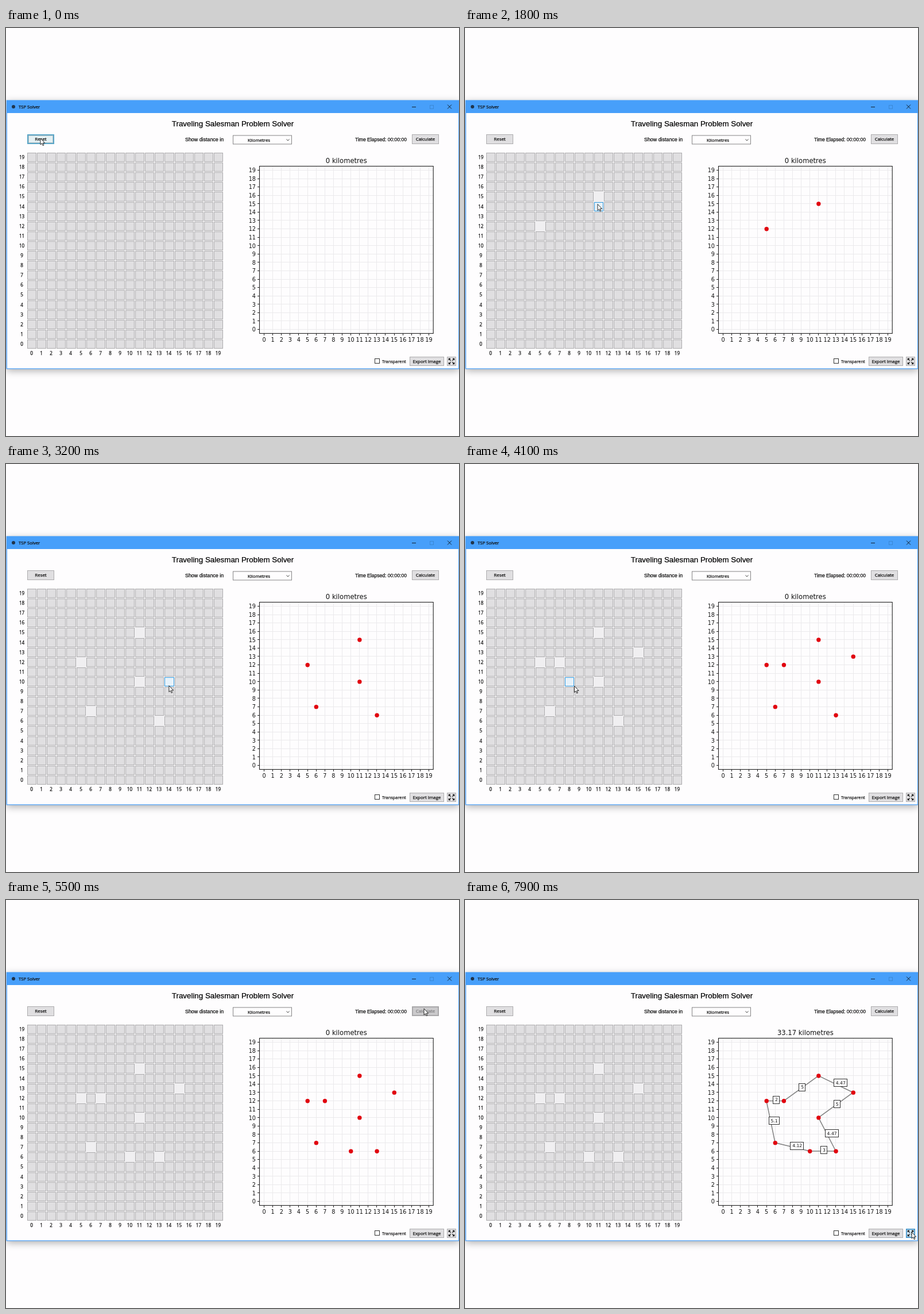
Write an HTML page with a canvas that moves like this. It is 789 by 710 pixels and loops after 8 s.

```html
<!DOCTYPE html>
<html lang="en">
<head>
<meta charset="utf-8">
<title>TSP Solver</title>
<style>
  html, body { margin: 0; width: 100%; height: 100%; overflow: hidden; background: #fefdfe; }
  canvas { display: block; }
</style>
</head>
<body>
<canvas id="stage" width="789" height="710"></canvas>
<script>
const ctx = document.getElementById('stage').getContext('2d');
const LOOP = 8000, STEP = 100, SOLVED = 5600;
const UI = '"Open Sans", "Noto Sans", sans-serif';
const ARIAL = '"Liberation Sans", Arial, sans-serif';
const PLOT = '"DejaVu Sans", sans-serif';
const PAPER = '#fefdfe', INK = '#111';
const N = 20, PITCH = 17.1;

const looks = {
  normal:   { fill: '#e0dfe1', line: '#adacae', w: 1 },
  hover:    { fill: '#e7f2fa', line: '#2d97dc', w: 1 },
  pressed:  { fill: '#cde2f1', line: '#3a90c8', w: 1.6 },
  focus:    { fill: '#e0dfe1', line: '#4a9aca', w: 2 },
  hot:      { fill: '#e4f0f3', line: '#5aa6c8', w: 2, dots: true },
  disabled: { fill: '#cbcacc', line: '#a9a8aa', w: 2, ink: '#858486' }
};

const px = c => 449.5 + 287 / 19 * c;
const py = r => 524.5 - 277 / 19 * r;
const cellX = c => Math.round(37 + PITCH * c);
const cellY = r => Math.round(217 + PITCH * (N - 1 - r));

// cities are chosen at an even pace
const cities = [[5, 12], [11, 15], [11, 10], [6, 7], [13, 6], [15, 13], [7, 12], [10, 6]]
  .map(([c, r], i) => ({ c, r, start: Math.floor((1300 + 443 * i) / STEP) * STEP }));

// the shortest tour visits the cities by angle around their centre
const mean = k => cities.reduce((sum, p) => sum + p[k], 0) / cities.length;
const angle = p => Math.atan2(p.r - mean('r'), p.c - mean('c'));
const tour = [...cities].sort((a, b) => angle(a) - angle(b));
const legs = tour.map((a, i) => {
  const b = tour[(i + 1) % tour.length];
  return { a, b, length: Math.hypot(a.c - b.c, a.r - b.r) };
});
const total = legs.reduce((sum, leg) => sum + leg.length, 0).toFixed(2);

const stops = [
  { x: 60, y: 192, arrive: 0, leave: 500 },
  ...cities.map((p, i) => ({
    x: cellX(p.c) + 6, y: cellY(p.r) + 2,
    arrive: i ? p.start - STEP : 900, leave: p.start
  })),
  { x: 728, y: 189, arrive: 5300, leave: 6600 },
  { x: 778, y: 578, arrive: 7500, leave: LOOP }
];

function text(s, x, y, size, font, align = 'left', color = INK) {
  ctx.font = `${size}px ${font}`;
  ctx.textAlign = align;
  ctx.fillStyle = ctx.strokeStyle = color;
  ctx.fillText(s, x, y);
  if (font === PLOT) return;
  // interface text is slightly heavier
  ctx.lineWidth = 0.25;
  ctx.strokeText(s, x, y);
}

function fill(x, y, w, h, color) {
  ctx.fillStyle = color;
  ctx.fillRect(x, y, w, h);
}

function box(x, y, w, h, look) {
  fill(x, y, w, h, look.fill);
  ctx.strokeStyle = look.line;
  ctx.lineWidth = look.w;
  ctx.strokeRect(x + look.w / 2, y + look.w / 2, w - look.w, h - look.w);
}

function line(points, color, width) {
  ctx.beginPath();
  points.forEach(([x, y]) => ctx.lineTo(x, y));
  ctx.strokeStyle = color;
  ctx.lineWidth = width;
  ctx.stroke();
}

function dot(x, y, r, color) {
  ctx.fillStyle = color;
  ctx.beginPath();
  ctx.arc(x, y, r, 0, 2 * Math.PI);
  ctx.fill();
}

function button(label, x, y, w, h, name) {
  const look = looks[name];
  box(x, y, w, h, look);
  if (look.dots) {
    ctx.setLineDash([1, 1]);
    ctx.strokeStyle = '#8a979b';
    ctx.lineWidth = 1;
    ctx.strokeRect(x + 2.5, y + 2.5, w - 5, h - 5);
    ctx.setLineDash([]);
  }
  text(label, x + w / 2, y + 11, 7.9, UI, 'center', look.ink);
}

function pointerAt(t) {
  const i = stops.findLastIndex(s => s.arrive <= t);
  const from = stops[i], to = stops[i + 1];
  if (!to || t <= from.leave) return [from.x, from.y];
  const u = (t - from.leave) / (to.arrive - from.leave);
  const v = u ** 1.07;
  const ex = 1 - (1 - u) ** 1.12, ey = v * v * (3 - 2 * v);
  return [from.x + (to.x - from.x) * ex, from.y + (to.y - from.y) * ey];
}

function drawFrame() {
  fill(0, 0, 789, 710, PAPER);
  ctx.save();
  ctx.shadowColor = 'rgba(0,0,0,.3)';
  ctx.shadowBlur = 12;
  ctx.shadowOffsetY = 3;
  fill(0.7, 125.5, 788.3, 468, '#479ffa');
  ctx.restore();
  fill(2, 148, 786, 444.3, PAPER);

  dot(13, 137, 3, '#20354c');
  text('TSP Solver', 22, 140, 7.7, UI);
  line([[707, 137.5], [714, 137.5]], '#15202c', 1);
  ctx.strokeStyle = '#3b89d6';
  ctx.strokeRect(738.5, 134.5, 6, 6);
  line([[769, 133.5], [776, 140.5]], '#15202c', 1);
  line([[776, 133.5], [769, 140.5]], '#15202c', 1);

  text('Traveling Salesman Problem Solver', 395, 171, 13.35, ARIAL, 'center', '#000');
  text('Show distance in', 312, 197, 8.9, ARIAL);
  text('Time Elapsed: 00:00:00', 608, 196.5, 8.55, ARIAL);
  box(395, 186.5, 103, 16, { fill: PAPER, line: '#858486', w: 1 });
  text('Kilometres', 440.5, 197.5, 7.8, UI, 'center');
  line([[488.5, 193.5], [491, 196], [493.5, 193.5]], '#444', 1);

  box(642, 575, 9, 9, { fill: '#fff', line: '#333', w: 1 });
  text('Transparent', 655, 583, 7.4, UI);
}

function drawExpand(name) {
  box(768, 572, 16, 16, looks[name]);
  for (const sx of [-1, 1]) for (const sy of [-1, 1]) {
    const at = (a, b) => [776 + sx * a, 580 + sy * b];
    line([at(1.2, 1.2), at(4.5, 4.5)], INK, 1.1);
    line([at(2, 4.6), at(4.6, 4.6), at(4.6, 2)], INK, 1.2);
  }
}

function drawCells(t, mx, my) {
  const hc = Math.floor((mx - 36.9) / PITCH);
  const hr = N - 1 - Math.floor((my - 216.9) / PITCH);
  for (let r = 0; r < N; r++) {
    text(r, 27.6, cellY(r) + 11, 8.1, UI, 'center');
    text(r, cellX(r) + 7.5, 568.7, 8.1, UI, 'center');
    for (let c = 0; c < N; c++) {
      const x = cellX(c), y = cellY(r);
      const w = cellX(c + 1) - x - 1, h = cellY(r - 1) - y - 1;
      const city = cities.find(p => p.c === c && p.r === r);
      if (city && t >= city.start) {
        fill(x - 1, y - 1, w + 2, h + 2, '#f0eff1');
        continue;
      }
      const over = c === hc && r === hr;
      const down = over && city && t >= city.start - STEP;
      box(x, y, w, h, looks[down ? 'pressed' : over ? 'hover' : 'normal']);
    }
  }
}

function drawLabel({ a, b, length }) {
  const s = String(+length.toFixed(2));
  const x = px((a.c + b.c) / 2), y = py((a.r + b.r) / 2);
  ctx.font = `7.7px ${PLOT}`;
  const w = ctx.measureText(s).width;
  box(Math.floor(x - 3.5), Math.round(y - 9), Math.round(w + 7), 14,
      { fill: PAPER, line: '#333', w: 1 });
  text(s, x - 0.2, y + 0.7, 7.7, PLOT);
}

function drawPlot(t) {
  const solved = t >= SOLVED;
  for (let i = 0; i < N; i++) {
    const x = Math.floor(px(i)) + 0.5, y = Math.floor(py(i)) + 0.5;
    line([[x, 240], [x, 531]], '#ebeaec', 1);
    line([[441, y], [744, y]], '#ebeaec', 1);
    line([[x, 532], [x, 535]], '#222', 1);
    line([[438, y], [441, y]], '#222', 1);
    text(i, px(i), 546, 9.7, PLOT, 'center');
    text(i, 435, py(i) + 3.8, 9.7, PLOT, 'right');
  }
  ctx.strokeStyle = '#222';
  ctx.lineWidth = 1.1;
  ctx.strokeRect(441.5, 240.5, 302.7, 291);
  text(`${solved ? total : 0} kilometres`, 592.8, 234.5, 11.6, PLOT, 'center');

  if (solved)
    for (const { a, b } of legs)
      line([[px(a.c), py(a.r)], [px(b.c), py(b.r)]], '#7f7f7f', 1.5);
  for (const p of cities)
    if (t >= p.start) dot(px(p.c) + 0.2, py(p.r) + 0.2, 3.7, '#e1040f');
  if (solved) legs.forEach(drawLabel);
}

function drawPointer(x, y) {
  ctx.save();
  ctx.translate(x, y);
  const arrow = new Path2D('M0 0V11L2.5 8.7L4.2 12.6L5.9 11.9L4.2 8.1H7.6Z');
  ctx.fillStyle = '#fff';
  ctx.fill(arrow);
  ctx.strokeStyle = INK;
  ctx.lineWidth = 0.9;
  ctx.stroke(arrow);
  ctx.restore();
}

function calculateLook(t) {
  if (t < 5300 || t >= 7600) return 'normal';
  if (t < 5400) return 'hover';
  if (t < SOLVED) return 'disabled';
  return t < 6800 ? 'hot' : 'focus';
}

function draw(t) {
  const [mx, my] = pointerAt(t);
  drawFrame();
  button('Reset', 37, 185, 47, 17, t < 600 ? 'hot' : t < 1200 ? 'focus' : 'normal');
  button('Calculate', 707, 185, 47, 17, calculateLook(t));
  button('Export Image', 703, 572, 60, 16, 'normal');
  drawExpand(t >= 7600 ? 'pressed' : t >= 7400 ? 'hover' : 'normal');
  drawCells(t, mx, my);
  drawPlot(t);
  drawPointer(mx, my);
}

const begin = performance.now();
let shown = -1;
function tick() {
  const t = Math.floor((performance.now() - begin) % LOOP / STEP) * STEP;
  if (t !== shown) draw(shown = t);
  requestAnimationFrame(tick);
}
tick();
</script>
</body>
</html>
```
